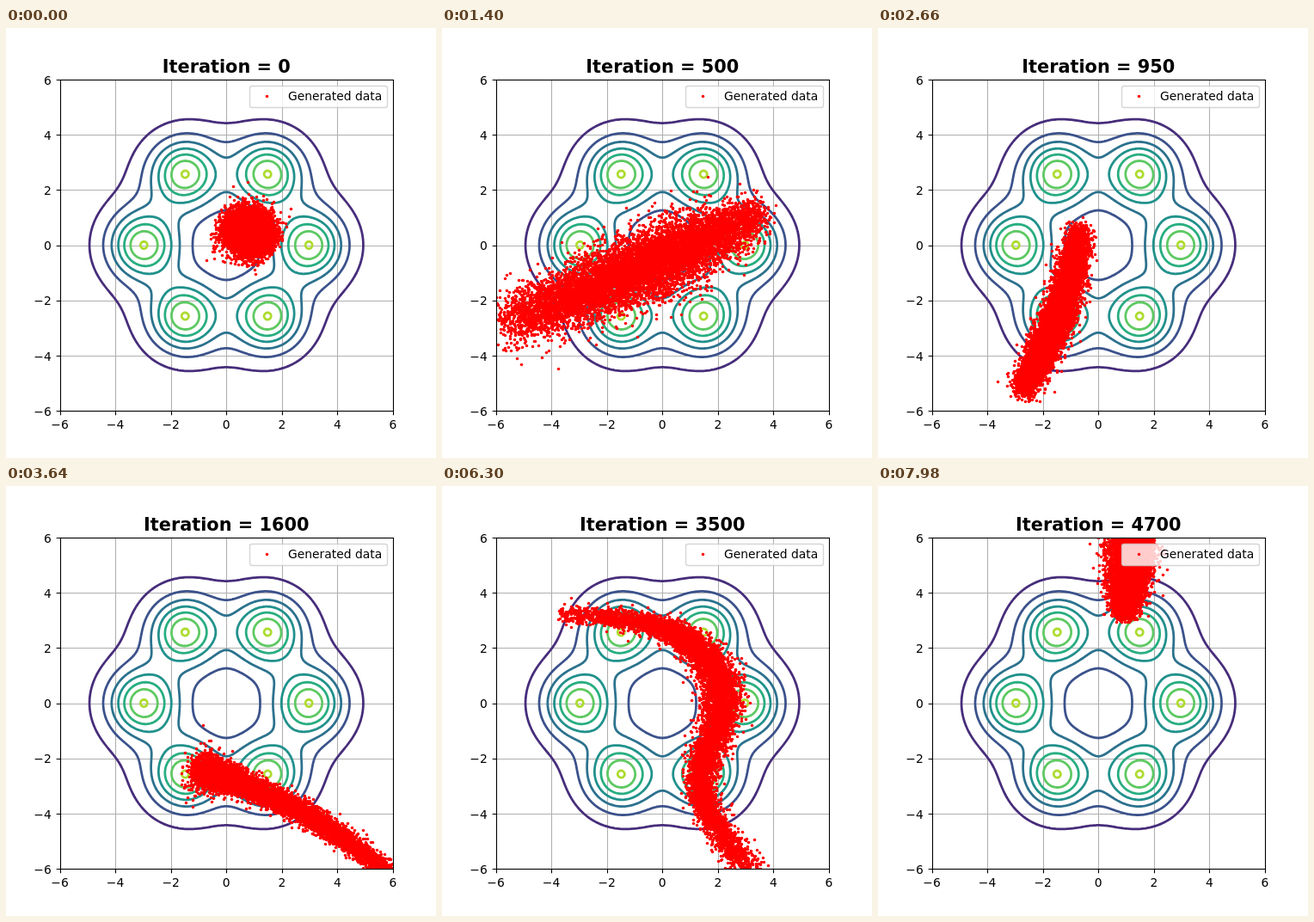
Animation, 500 px wide and 500 px high, one loop 8 s. Source, as an HTML page with a canvas:

```html
<!DOCTYPE html>
<html lang="en">
<head>
<meta charset="utf-8">
<title>Generated data</title>
<style>
html, body { margin: 0; width: 100%; height: 100%; overflow: hidden; background: #fff; }
svg, canvas { position: absolute; left: 0; top: 0; width: 500px; height: 500px; }
text { font: 13.89px "DejaVu Sans", sans-serif; }
#title { font-size: 20.83px; font-weight: bold; text-anchor: middle; }
#grid { stroke: #b0b0b0; stroke-width: 1.11; }
#contours { fill: none; stroke-width: 2.78; stroke-linecap: round; }
#ticks { stroke: #000; stroke-width: 1.11; }
</style>
</head>
<body>
<svg viewBox="0 0 500 500"><g id="grid"></g><g id="contours"></g></svg>
<canvas id="dots" width="500" height="500"></canvas>
<svg viewBox="0 0 500 500">
  <rect x="63.5" y="60.5" width="387" height="385" fill="none" stroke="#000" stroke-width="1.11"/>
  <g id="ticks"></g>
  <g id="labels"></g>
  <rect x="283.5" y="67.5" width="160" height="25" rx="2.8" fill="#fff" fill-opacity=".8" stroke="#ccc" stroke-opacity=".8" stroke-width="1.39"/>
  <circle cx="303.5" cy="79.5" r="1.75" fill="#f00"/>
  <text x="328" y="84">Generated data</text>
  <text id="title" x="256.25" y="52"></text>
</svg>
<script>
const $ = id => document.getElementById(id);
const px = x => 256.25 + x * 387.5 / 12;
const py = y => 252.5 - y * 385 / 12;
const snap = v => Math.floor(v + 0.5) + 0.5;

function add(parent, tag, attrs, text) {
  const el = document.createElementNS("http://www.w3.org/2000/svg", tag);
  for (const k in attrs) el.setAttribute(k, attrs[k]);
  if (text !== undefined) el.textContent = text;
  $(parent).append(el);
}

// Axes
for (let v = -6; v <= 6; v += 2) {
  const x = snap(px(v)), y = snap(py(v));
  const label = v < 0 ? "\u2212" + -v : v;
  if (Math.abs(v) < 6) add("grid", "path", { d: `M${x} 60V445M63 ${y}H450` });
  add("ticks", "path", { d: `M${x} 445.5v4.86M63.5 ${y}h-4.86` });
  add("labels", "text", { x: px(v), y: 466, "text-anchor": "middle" }, label);
  add("labels", "text", { x: 52.8, y: Math.round(py(v) + 5.75), "text-anchor": "end" }, label);
}

// Contours of six heavy-tailed bumps on a ring of radius 3, at evenly spaced levels
const centres = Array.from({ length: 6 }, (_, k) => [3 * Math.cos(k * Math.PI / 3), 3 * Math.sin(k * Math.PI / 3)]);
const density = (x, y) => centres.reduce(
  (sum, [cx, cy]) => sum + (1 + ((x - cx) ** 2 + (y - cy) ** 2) / 3.5) ** -2.75, 0);

const CELLS = 220, SIZE = 12 / CELLS;
const field = Array.from({ length: CELLS + 1 }, (_, j) =>
  Array.from({ length: CELLS + 1 }, (_, i) => density(i * SIZE - 6, j * SIZE - 6)));

// Marching squares
function contour(level) {
  let d = "";
  for (let j = 0; j < CELLS; j++) for (let i = 0; i < CELLS; i++) {
    const corners = [[i, j], [i + 1, j], [i + 1, j + 1], [i, j + 1]];
    const hits = [];
    corners.forEach(([ax, ay], k) => {
      const [bx, by] = corners[(k + 1) % 4];
      const a = field[ay][ax] - level, b = field[by][bx] - level;
      if (a > 0 === b > 0) return;
      const f = a / (a - b);
      hits.push(px((ax + (bx - ax) * f) * SIZE - 6).toFixed(2) + " " + py((ay + (by - ay) * f) * SIZE - 6).toFixed(2));
    });
    for (let k = 0; k + 1 < hits.length; k += 2) d += `M${hits[k]}L${hits[k + 1]}`;
  }
  return d;
}

const viridis = ["#472d7b", "#3b528b", "#2c728e", "#21918c", "#28ae80", "#5ec962", "#addc30"];
viridis.forEach((stroke, k) => add("contours", "path", { d: contour(0.1507 * (k + 1)), stroke }));

// Cloud shapes: a spine through a few points [x, y, half width]
const poses = [
  { step: 0, spine: [[0.2, 0.8, 0.85], [1.4, 0.15, 0.8]] },
  { step: 10, spine: [[-5.8, -2.9, 1.1], [-2.3, -1.5, 1.2], [0.6, -0.2, 1.3], [3.7, 1.2, 0.7]] },
  { step: 19, spine: [[-2.8, -5.4, 0.5], [-1.45, -2.6, 0.6], [-0.6, 0.7, 0.45]] },
  { step: 26, spine: [[-1.1, -2.4, 0.9], [0.2, -2.8, 0.5], [3, -4.1, 0.4], [6.5, -6.6, 0.35]] },
  { step: 35, spine: [[-7.5, -0.75, 0.45], [-2.4, 0.5, 0.45], [2, 1.2, 0.55], [4.1, 1.4, 1.1]] },
  { step: 45, spine: [[-3.7, 3.25, 0.3], [0.2, 2.65, 0.45], [2.2, 0.4, 0.75], [1.4, -3.2, 0.5], [3.4, -6.4, 0.6]] },
  { step: 57, spine: [[0.87, 3.1, 0.35], [1.1, 4.6, 0.75], [1.2, 7, 0.9]] }
];

let seed = 7;
function rand() {
  seed = (seed + 0x6D2B79F5) | 0;
  let t = Math.imul(seed ^ (seed >>> 15), 1 | seed);
  t = (t + Math.imul(t ^ (t >>> 7), 61 | t)) ^ t;
  return ((t ^ (t >>> 14)) >>> 0) / 4294967296;
}
const normal = () => Math.sqrt(-2 * Math.log(1 - rand())) * Math.cos(2 * Math.PI * rand());

const particles = Array.from({ length: 9000 }, () => ({
  u: (rand() + 0.3 * rand()) / 1.3,
  across: (0.35 + 0.2 * rand()) * normal(),
  along: 0.3 * normal()
}));

// Catmull-Rom value and slope of each coordinate at u in 0..1
function spline(pts, u) {
  const last = pts.length - 1;
  const k = Math.min(Math.floor(u * last), last - 1), t = u * last - k;
  const at = n => pts[Math.max(0, Math.min(last, n))];
  const [p, q, r, s] = [at(k - 1), at(k), at(k + 1), at(k + 2)];
  return q.map((_, c) => {
    const b = r[c] - p[c];
    const m = 2 * p[c] - 5 * q[c] + 4 * r[c] - s[c];
    const n = 3 * (q[c] - r[c]) + s[c] - p[c];
    return [q[c] + 0.5 * t * (b + t * (m + t * n)), 0.5 * (b + t * (2 * m + 3 * t * n))];
  });
}

const clouds = poses.map(({ step, spine }) => ({
  step,
  pts: particles.map(({ u, across, along }) => {
    const [[x, dx], [y, dy], [w]] = spline(spine, u);
    const scale = w / (Math.hypot(dx, dy) || 1);
    return [x + scale * (along * dx - across * dy), y + scale * (along * dy + across * dx)];
  })
}));

const dot = document.createElement("canvas");
dot.width = dot.height = 5;
const pen = dot.getContext("2d");
pen.fillStyle = "#f00";
pen.arc(2.5, 2.5, 1.75, 0, 7);
pen.fill();

const ctx = $("dots").getContext("2d");
ctx.beginPath();
ctx.rect(63, 60, 387, 385);
ctx.clip();

function draw(step) {
  $("title").textContent = "Iteration = " + (step <= 20 ? step * 50 : 1000 + (step - 20) * 100);
  let k = 0;
  while (k < clouds.length - 2 && clouds[k + 1].step <= step) k++;
  const from = clouds[k], to = clouds[k + 1];
  const f = (step - from.step) / (to.step - from.step);
  const stretch = 1 + 0.4 * Math.sin(Math.PI * f);
  ctx.clearRect(0, 0, 500, 500);
  from.pts.forEach(([x, y], i) => {
    const [x2, y2] = to.pts[i];
    ctx.drawImage(dot,
      Math.floor(px((x + (x2 - x) * f) * stretch)) - 2,
      Math.floor(py((y + (y2 - y) * f) * stretch)) - 2);
  });
}

const start = performance.now();
let shown = -1;
function tick() {
  const step = Math.floor((performance.now() - start) % 8000 / 140);
  if (step !== shown) draw(shown = step);
  requestAnimationFrame(tick);
}
tick();
</script>
</body>
</html>
```
